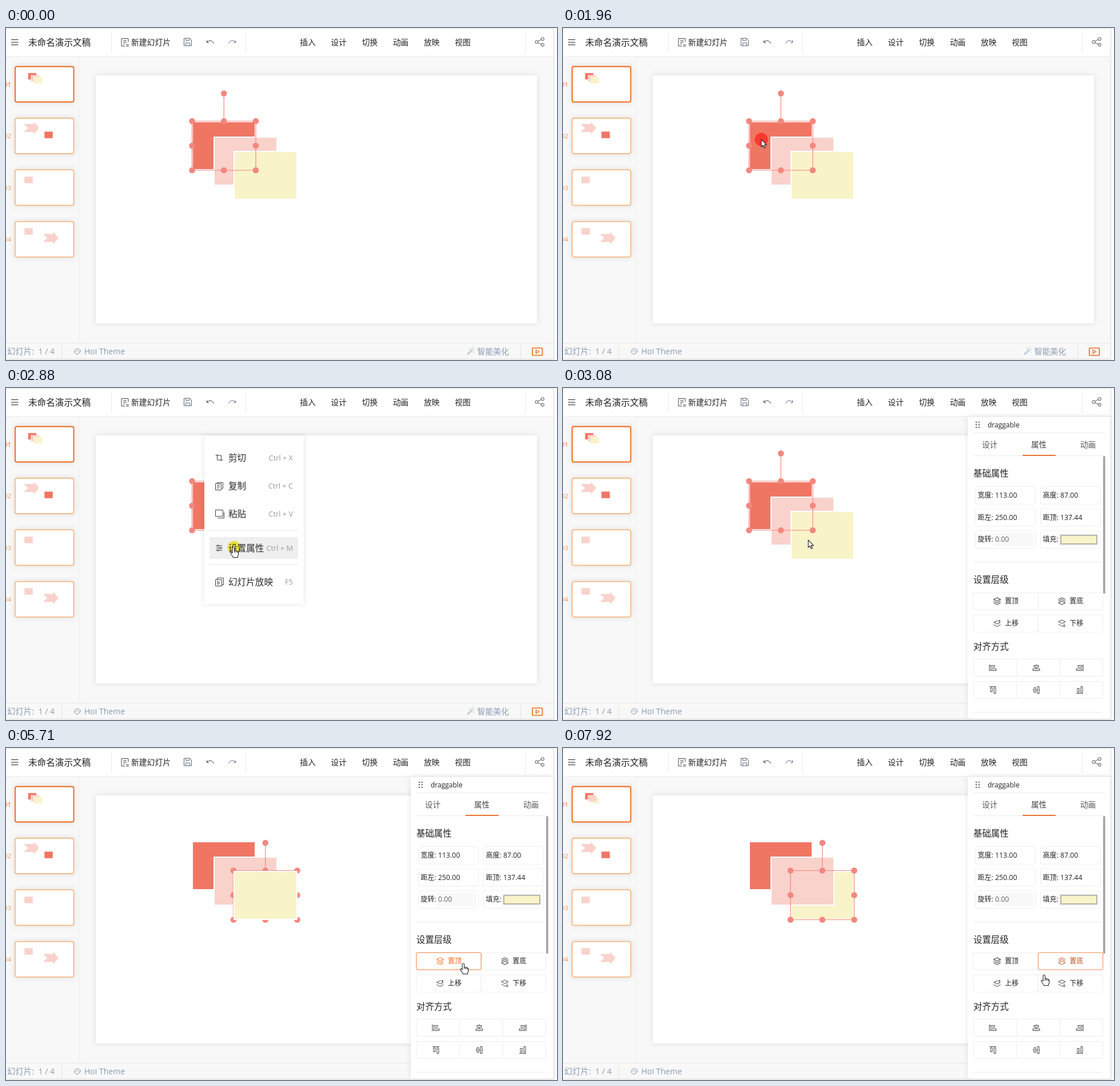
Recreate the animation shown at these times as an HTML page. Size 964x581 px, loop 7990 ms.

```html
<!DOCTYPE html>
<html lang="zh-CN">
<head>
<meta charset="utf-8">
<title>Slide editor</title>
<style>
html, body { margin: 0; width: 100%; height: 100%; overflow: hidden; background: #fff; }
svg { display: block; width: 964px; height: 581px; }
text { font-family: 'Open Sans', 'Noto Sans CJK SC', 'Noto Sans CJK JP', sans-serif; white-space: pre; }
.ico { fill: none; stroke: #444; stroke-width: 1; stroke-linejoin: round; }
.shadow { filter: drop-shadow(0 0 5px rgba(0, 0, 0, .11)); }
.click { mix-blend-mode: multiply; }
</style>
</head>
<body>
<svg id="stage" viewBox="0 0 964 581" xmlns="http://www.w3.org/2000/svg"></svg>
<script>
const LOOP = 7990, TICK = 67;
const ORANGE = '#f2691b', BLUE = '#8b9bb3', HANDLE = '#f2877f';
const RED = '#f07664', PINK = '#f9d2cb', YELLOW = '#f9f3ca';

// Markup helpers
const text = (x, cy, size, fill, s, extra = '') =>
  `<text x="${x}" y="${cy + size * .37}" font-size="${size}" fill="${fill}" ${extra}>${s}</text>`;
const rect = (x, y, w, h, fill, extra = '') =>
  `<rect x="${x}" y="${y}" width="${w}" height="${h}" fill="${fill}" ${extra}/>`;
const hline = (x, y, w, c = '#ebebeb') => rect(x, y, w, 1, c);
const vline = (x, y, h, c = '#ebebeb') => rect(x, y, 1, h, c);
const icon = (x, y, d, extra = '') =>
  `<path class="ico" transform="translate(${x} ${y})" d="${d}" ${extra}/>`;
const group = (id, body, extra = '') => `<g id="${id}" ${extra}>${body}</g>`;
const block = (x, y, fill, extra = '') =>
  rect(x, y, 110, 84, fill, `stroke="#fff" stroke-width="2" ${extra}`);

function selection() {
  const w = 111.5, h = 86;
  const dots = [[w / 2, -48.5]];
  for (const x of [0, w / 2, w])
    for (const y of [0, h / 2, h])
      if (x !== w / 2 || y !== h / 2) dots.push([x, y]);
  return `<path d="M0 0H${w}V${h}H0ZM${w / 2} 0V-48" fill="none" stroke="${HANDLE}" stroke-width="1.2"/>` +
    dots.map(([x, y]) => `<circle cx="${x}" cy="${y}" r="5.3" fill="${HANDLE}"/>`).join('');
}

function toolbar() {
  const tabs = ['插入', '设计', '切换', '动画', '放映', '视图'];
  return rect(0, 0, 959, 49, '#fff') + hline(0, 49, 959) +
    [184, 419, 908].map(x => vline(x, 5, 39)).join('') +
    icon(9, 20.5, 'M0 0H12.5M0 4.5H12.5M0 9H12.5', 'style="stroke:#222"') +
    text(39, 25, 15.6, '#222', '未命名演示文稿') +
    icon(202, 18.5, 'M12 6V0H0V13H6M3 3.5H9M3 6.5H9M3 9.5H6M8 11H13M8 13.5H13') +
    text(219, 25, 13.8, '#222', '新建幻灯片') +
    icon(311.5, 18, 'M0 0H10L13 3V13H0ZM3 0V4H9V0M3 13V8H10V13', 'style="stroke:#59657a"') +
    icon(350, 20, 'M1 5Q8 -2 14 7M5 6L1 5L2 1.5', 'style="stroke:#3d3d50"') +
    icon(389, 20, 'M0 7Q6 -2 13 5M9 6L13 5L12.5 1.5', 'style="stroke:#5f6f86"') +
    tabs.map((s, i) => text(514.3 + i * 54.2, 25, 13.7, '#222', s)).join('') +
    icon(926, 17, 'M5 6L11 3M5 9L11 12', 'style="stroke:#555"') +
    [[928.5, 24.5], [938.8, 19.3], [938.8, 29.3]].map(([x, y]) =>
      `<circle class="ico" cx="${x}" cy="${y}" r="2.6"/>`).join('');
}

function sidebar() {
  const arrow = (x, y) =>
    `<path transform="translate(${x} ${y})" fill="${PINK}" d="M0 4H17.500V0L27 11L17.500 22V18H0L7 11Z"/>`;
  const mini = (x, y, c) => rect(x, y, 14.500, 11.500, c);
  const frames = [0, 1, 2, 3].map(i => {
    const y = 67.5 + i * 90.4, on = i === 0;
    return rect(16, y, 102.5, 62, '#fff', `rx="3" class="shadow" stroke="${on ? ORANGE : '#f8b379'}" stroke-width="${on ? 1.9 : 1.6}"`) +
      text(9, y + 31, 11.5, on ? ORANGE : '#f29a5c', '0' + (i + 1), 'text-anchor="end"');
  }).join('');
  return vline(127, 50, 501, '#eee') + frames +
    '<use href="#art" transform="translate(-4.900 57) scale(.1334)"/>' +
    arrow(31, 164) + mini(67.3, 181.3, RED) +
    mini(32.3, 260, PINK) + mini(32.3, 350.3, PINK) + arrow(65, 356.500);
}

function status() {
  return rect(0, 551, 959, 29, '#f8f8f8') + hline(0, 551, 959, '#e8e8e8') +
    vline(97, 554, 23, '#e3e3e3') + vline(900, 554, 23, '#e3e3e3') +
    text(2, 566, 14.4, BLUE, '幻灯片:') + text(56.5, 566, 14, BLUE, '1 / 4') +
    icon(119.5, 561, 'M6 10Q-1 9 0 4Q3 -2 9 1Q13 4 9.500 7Q7 6 6 10M2 5Q5 2 7 4T10 4', `style="stroke:${BLUE}"`) +
    text(137, 566, 14, BLUE, 'Hoi Theme') +
    icon(807, 559, 'M0 11L8 3.500L9.500 5L1.500 12.500ZM5 1V3M10.500 0V2M12 4H13M11 8L12 9', `style="stroke:${BLUE}"`) +
    text(824.5, 566, 13.9, BLUE, '智能美化') +
    rect(920.8, 560, 17.6, 13, 'none', `rx="1.500" stroke="${ORANGE}" stroke-width="1.7"`) +
    `<path d="M927.300 563.500L932.500 566.500L927.300 569.500Z" fill="none" stroke="${ORANGE}" stroke-width="1.3"/>`;
}

function menu() {
  const items = [
    [122, '剪切', 'Ctrl + X', 'M3 -6V4H13M0 -4H10V6'],
    [171.5, '复制', 'Ctrl + C', 'M3 -4V-6H13V4H11M0 -4H10V7H0ZM2.500 -1H7.500M2.500 1.500H7.500M2.500 4H5.500'],
    [220.5, '粘贴', 'Ctrl + V', 'M0 -7H13V4H0ZM15 -3V7H4'],
    [280, '设置属性', 'Ctrl + M', 'M1 -4H3M6 -4H12M1 0H7M10 0H12M1 4H3M6 4H12M3 -5H6V-3H3ZM7 -1H10V1H7ZM3 3H6V5H3Z'],
    [339.5, '幻灯片放映', 'F5', 'M3 -4V-7H14V5H11M0 -4H11V7H0ZM4 -1.500L7.500 1.500L4 4.500Z']
  ];
  return rect(347, 83, 174, 295, '#fff', 'class="shadow"') +
    rect(356, 261, 155, 38, '#efefef', 'id="hover" rx="3"') +
    hline(356, 249, 155, '#e8e8e8') + hline(356, 308, 155, '#e8e8e8') +
    items.map(([y, name, key, d]) => icon(366.5, y, d) + text(389, y, 15.6, '#2a2a2a', name) +
      text(502, y, 12.8, '#959ba3', key, 'text-anchor="end"')).join('');
}

function field(col, row, label, value) {
  const x = col ? 835.5 : 721.5, y = 172.5 + row * 38.7;
  return rect(x, y, 105, 30.5, '#fff', 'rx="3" stroke="#eee"') +
    (value === '0.00' ? rect(x + 32, y + 4, 69, 23, '#f8f8f8') : '') +
    text(x + 4, y + 15, 12, '#222', label + ':') +
    (value ? text(x + 34.5, y + 15, 12.3, value === '0.00' ? '#666' : '#222', value)
           : rect(x + 32, y + 4, 68, 23, '#f5f5f5') + rect(x + 35.5, y + 8, 63, 15, YELLOW, 'stroke="#777"'));
}

const LAYER = {
  top: 'M6 -6L12 -3L6 0L0 -3ZM0 0L6 3L12 0M0 3L6 6L12 3',
  bottom: 'M6 6L12 3L6 0L0 3ZM0 0L6 -3L12 0M0 -3L6 -6L12 -3',
  up: 'M7 -5L0 -2L6 1L12 -2M0 2L6 5.500L12 2M10 -1V-6M8 -4L10 -6L12 -4',
  down: 'M6 -6L0 -3L6 0L12 -3ZM0 1L6 5L8 4M10 0V6M8 4L10 6L12 4'
};
function button(col, row, name, d, id) {
  const x = 718 + col * 113.3, y = 358 + row * 39;
  return `<g ${id ? `id="${id}"` : ''}>` +
    rect(x, y, 113.2, 30, '#fff', 'rx="2.500" stroke="#eee"') +
    icon(x + 35.5, y + 15, d) + text(x + 55, y + 15, 12, '#222', name) + '</g>';
}

function alignCells() {
  const icons = [
    'M-6 -6V6M-4 -4H3V-1H-4ZM-4 2H6V5H-4Z',
    'M0 -6V-4M0 -1V2M0 5V6M-4 -4H4V-1H-4ZM-6 2H6V5H-6Z',
    'M6 -6V6M-3 -4H4V-1H-3ZM-6 2H4V5H-6Z'
  ];
  return [0, 1].map(row => [0, 1, 2].map(col => {
    const y = 474.5 + row * 39;
    const turn = row ? `translate(${752 + col * 76} ${y + 15}) matrix(0 1 1 0 0 0)` : `translate(${752 + col * 76} ${y + 15})`;
    return rect(718 + col * 75.5, y, 75.5, 30, '#fff', 'stroke="#ededed" rx="2"') +
      `<path class="ico" transform="${turn}" d="${icons[col]}"/>`;
  }).join('')).join('');
}

function panel() {
  let dots = '';
  for (let i = 0; i < 6; i++) dots += rect(722 + i % 2 * 5, 59 + (i >> 1) * 4.5, 1.8, 1.8, '#333');
  return rect(708, 50, 250, 529, '#fff', 'class="shadow"') + dots +
    text(743, 64.5, 12, '#222', 'draggable') + hline(718, 78, 231) +
    text(733, 99, 13.6, '#555', '设计') + text(819, 99, 13.6, '#444', '属性') + text(905, 99, 13.6, '#555', '动画') +
    hline(718, 118, 228) + rect(804, 117, 58, 1.8, '#e8671f') +
    rect(945, 119, 3.6, 241, '#a3a3a3', 'rx="1.800"') +
    text(718, 149, 15.4, '#222', '基础属性') +
    field(0, 0, '宽度', '113.00') + field(1, 0, '高度', '87.00') +
    field(0, 1, '距左', '250.00') + field(1, 1, '距顶', '137.44') +
    field(0, 2, '旋转', '0.00') + field(1, 2, '填充') +
    hline(718, 304, 225) + text(718, 335, 15.4, '#222', '设置层级') +
    button(0, 1, '上移', LAYER.up) + button(1, 1, '下移', LAYER.down) +
    button(0, 0, '置顶', LAYER.top, 'toTop') + button(1, 0, '置底', LAYER.bottom, 'toBottom') +
    text(718, 452, 15.4, '#222', '对齐方式') + alignCells() + hline(718, 567, 226);
}

const stage = document.getElementById('stage');
stage.innerHTML =
  rect(0, 0, 959, 580, '#f8f8f8') +
  rect(157, 83, 772, 434, '#fff', 'class="shadow"') +
  group('art', block(399, 216, YELLOW, 'id="yLow"') + block(326, 164, RED) +
    block(364, 191, PINK) + block(399, 216, YELLOW, 'id="yMid"')) +
  group('sel', selection()) + block(399, 216, YELLOW, 'id="yHigh"') +
  sidebar() + toolbar() + status() + group('menu', menu()) + group('panel', panel()) +
  hline(0, 0, 959, '#dcdcdc') + hline(0, 579, 959, '#d4d4d4') + vline(958, 0, 580, '#d8d8d8') +
  '<circle id="click" r="11.500"/>' +
  group('cursor',
    '<path id="arrow" d="M0 0V13L3 10.200L5.200 15L7.200 14.100L5.100 9.500H9.300Z"/>' +
    '<path id="hand" d="M-2 2Q-2 0 -.2 0Q1.500 0 1.500 2V7Q3 6 4.300 7.200Q6 6.600 7 8Q8.600 7.700 8.600 10V13Q8.600 15 7.300 17V18.500H-.5Q-2 15.500 -4.500 12.500Q-5.600 10.500 -4.800 9.600Q-3.600 9 -2 11ZM1.500 7V10M4.300 7.500V10M7 8.300V10.500"/>',
    'fill="#fff" stroke="#222" stroke-width="1.1" stroke-linejoin="round"');

const el = id => document.getElementById(id);
const show = (id, on) => el(id).setAttribute('visibility', on ? 'inherit' : 'hidden');
const move = (id, x, y) => el(id).setAttribute('transform', `translate(${x} ${y})`);
const within = (t, a, b) => t >= a && t < b;
const clamp = v => Math.max(0, Math.min(1, v));

// time, x, y of the pointer tip; eased between entries
const PATH = [
  [335, 897, 571], [1072, 354, 203], [1280, 341, 188], [1474, 347, 195],
  [2345, 347, 195], [2814, 398, 278], [2948, 398, 278], [3149, 440, 262],
  [3216, 440, 262], [3685, 794.5, 377], [5628, 794.5, 377],
  [6097, 897, 376], [7571, 897, 376], [7906, 842, 397]
];
function pointer(t) {
  const q = Math.floor((t + 6) / TICK) * TICK;
  const i = PATH.findIndex(k => k[0] > q);
  if (i < 1) return (i < 0 ? PATH[PATH.length - 1] : PATH[0]).slice(1);
  const [t0, x0, y0] = PATH[i - 1], [t1, x1, y1] = PATH[i];
  const p = (q - t0) / (t1 - t0), e = p * p * (3 - 2 * p);
  return [x0 + (x1 - x0) * e, y0 + (y1 - y0) * e];
}

// start, end, x, y, colour of each press mark
const CLICKS = [
  [1690, 2090, 347, 195, '#ff2a22'], [2820, 2950, 399, 279, '#f6f03a'],
  [3230, 3300, 441, 263, '#f6f03a'], [4250, 4380, 794, 377.5, '#f6f03a'],
  [6510, 6650, 896.5, 376.5, '#f6f03a']
];

const mix = (a, b, p) => `rgb(${a.map((v, i) => Math.round(v + (b[i] - v) * p))})`;
function tint(id, p) {
  const [box, mark, label] = el(id).children;
  const ink = mix([34, 34, 34], [242, 105, 27], p);
  box.setAttribute('stroke', mix([238, 238, 238], [242, 118, 45], Math.sqrt(p)));
  mark.style.stroke = ink;
  label.setAttribute('fill', ink);
}

function render(t) {
  const [x, y] = pointer(t);
  show('cursor', t >= 330);
  move('cursor', x, y);
  const hand = within(t, 2550, 3020) || t >= 3570;
  show('arrow', t >= 330 && !hand);
  show('hand', hand);

  const hit = CLICKS.find(c => within(t, c[0], c[1]));
  show('click', hit);
  if (hit) {
    move('click', hit[2], hit[3]);
    el('click').setAttribute('fill', hit[4]);
    el('click').setAttribute('fill-opacity', hit[0] === 1690 ? .8 : .9);
    el('click').setAttribute('class', hit[0] === 1690 ? '' : 'click');
  }

  show('menu', within(t, 2090, 2950));
  show('hover', within(t, 2090, 2950) && x > 356 && (y > 261 || within(y, 201, 240)));
  el('hover').setAttribute('y', y > 261 ? 261 : 201);
  show('panel', t >= 2950);

  const second = t >= 3230;
  show('sel', !within(t, 3090, 3230));
  move('sel', second ? 398 : 325.5, second ? 214.5 : 163);
  show('yLow', t >= 6650);
  show('yMid', t < 6650);
  show('yHigh', within(t, 4320, 6650));

  tint('toTop', clamp((t - 3570) / 130) * clamp((6100 - t) / 200));
  const low = clamp((t - 5900) / 200) * clamp(1 - (t - 7840) / 300);
  tint('toBottom', low);
  const front = el(t < 5950 ? 'toTop' : 'toBottom');
  if (front.nextElementSibling.id.startsWith('to')) front.parentNode.insertBefore(front.nextElementSibling, front);
}

const start = performance.now();
function tick(now) {
  render(Math.max(0, now - start) % LOOP);
  requestAnimationFrame(tick);
}
render(0);
requestAnimationFrame(tick);
</script>
</body>
</html>
```
